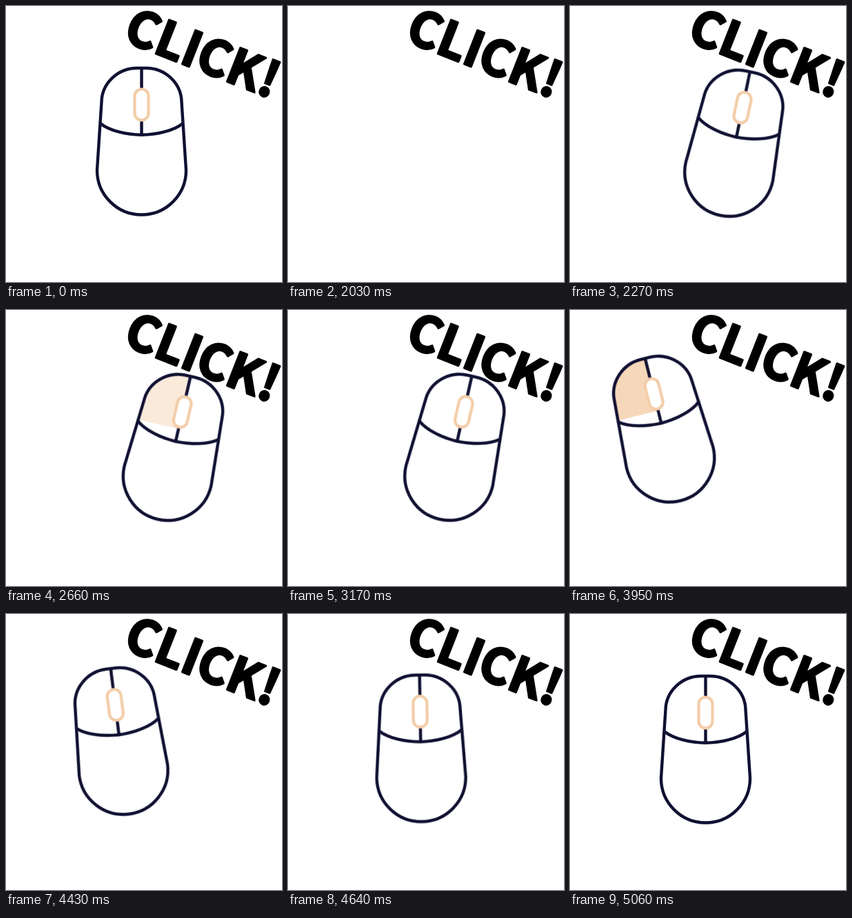
Recreate the animation shown at these times as an HTML page. Size 400 by 400 pixels, loop 5.09 s.

```html
<!DOCTYPE html>
<html lang="en">
<head>
<meta charset="utf-8">
<title>Click</title>
<style>
  html, body { margin: 0; width: 100%; height: 100%; overflow: hidden; background: #fff; }
  svg { display: block; width: 100vw; height: 100vh; }
  #mouse { transform-origin: 196.5px 196px; }
  .ink { fill: none; stroke: #101032; stroke-width: 4.4; }
  .wheel { fill: #fff; stroke: #f3cda8; stroke-width: 4.2; }
  #press { fill: #f3cda8; opacity: 0; }
  text {
    font: 700 71px "Noto Sans CJK JP", "Noto Sans CJK SC", "Noto Sans CJK", "Open Sans", sans-serif;
    text-anchor: middle;
    stroke: #000; stroke-width: 3.1; stroke-linejoin: round;
  }
</style>
</head>
<body>
<svg viewBox="0 0 400 400">
  <text transform="translate(276.1 92.1) rotate(21.4)">CLICK!</text>
  <g id="mouse">
    <path id="press" d="M136.5 168 L138.5 139 C139 112 162 90 190 90 H196.5 V168 Z"/>
    <path class="ink" d="M132 238 L138.5 139 C139 112 162 90 190 90 H203 C231 90 254 112 254.5 139 L261 238 A64.5 64.5 0 0 1 132 238 Z"/>
    <path class="ink" d="M136.5 170 C150 181 175 186.7 196.5 186.7 S243 181 256.5 170 M196.5 90 V120 M196.5 166 V187"/>
    <rect class="wheel" x="186.5" y="120.5" width="20" height="45" rx="10"/>
  </g>
</svg>
<script>
  const LOOP = 5090, STEP = 30, START = 2030;
  const mouse = document.getElementById('mouse');
  const press = document.getElementById('press');

  const pose = (x, y, deg) => `translate(${x}px, ${y}px) rotate(${deg}deg)`;
  const home = pose(0, 0, 0);
  const right = pose(47.3, 3.5, 12.9);
  const left = pose(-62, -23, -14);
  const swift = 'cubic-bezier(.15, .65, .3, 1)';
  const glide = 'cubic-bezier(.25, 0, .5, 1)';

  // Each row: time in ms, value, easing towards the next row
  const moves = [
    [0, home], [2030, home, swift], [2510, right],
    [3150, right, glide], [3710, left],
    [4210, left, glide], [4760, home], [LOOP, home]
  ];
  const presses = [
    [0, 0],
    [2570, 0], [2780, 1], [2840, 1], [3050, 0],
    [3710, 0], [3860, 1], [3920, 1], [4070, 0],
    [4760, 0], [4880, 1], [4940, 1], [5060, 0],
    [LOOP, 0]
  ];

  function track(el, prop, rows) {
    const frames = rows.map(([at, value, easing = 'linear']) =>
      ({ offset: at / LOOP, [prop]: value, easing }));
    const anim = el.animate(frames, { duration: LOOP, fill: 'both' });
    anim.pause();
    return anim;
  }

  const tracks = [track(mouse, 'transform', moves), track(press, 'opacity', presses)];
  const begin = performance.now();

  function draw() {
    const t = (performance.now() - begin) % LOOP;
    const at = t < START ? 0 : START + Math.floor((t - START) / STEP) * STEP;
    for (const anim of tracks) anim.currentTime = at;
    // The mouse blinks out for one step before it sets off
    mouse.style.visibility = at === START ? 'hidden' : 'visible';
    requestAnimationFrame(draw);
  }
  draw();
</script>
</body>
</html>
```
